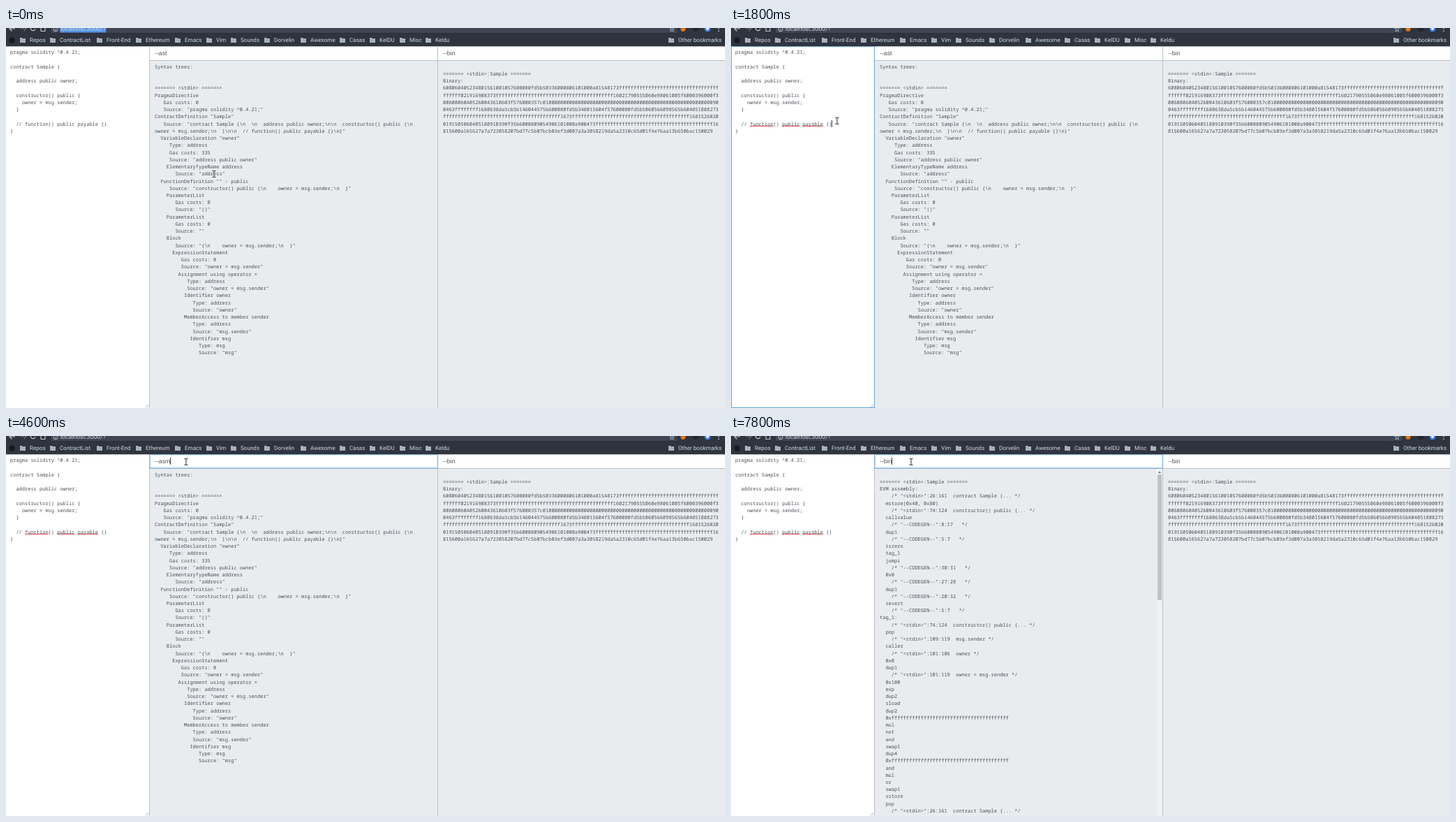
Write an HTML page that moves like this. It is 1030 by 544 pixels and loops after 8000 ms.

```html
<!DOCTYPE html>
<html lang="en">
<head>
<meta charset="utf-8">
<title>Compiler output panels</title>
<style>
  html, body { margin: 0; width: 100%; height: 100%; overflow: hidden; background: #fff; }
  svg { display: block; }
  text { white-space: pre; text-rendering: geometricPrecision; }
  .code { font: 7px "Noto Sans Mono", monospace; fill: #495057; }
  .flag { font: 8.75px "Liberation Sans", Arial, sans-serif; fill: #495057; }
  .mark { font: 8.1px Roboto, sans-serif; fill: #d3dae3; }
  .url { font: 8.7px Roboto, sans-serif; fill: #d3dae3; }
  .edge { fill: none; stroke: #bcc1c6; }
  .focus { fill: none; stroke: #66a5de; }
  .icon { fill: none; stroke: #c3c9d3; }
</style>
</head>
<body>
<svg id="stage" width="1030" height="544" viewBox="0 0 1030 544">
  <rect width="1030" height="544" fill="#fff"/>

  <g id="browser">
    <rect width="1030" height="26" fill="#2f343f"/>
    <rect x="63.5" y="-8" width="899" height="15.5" rx="2" fill="#404552" stroke="#2b2e39"/>
    <path class="icon" d="M5 1H13M8.500 -3L5 1L8.500 4.500M35.800 -1A3.300 3.300 0 1 0 42 1M50 0V4.500H56V0" stroke-width="1.100"/>
    <path class="icon" d="M21 1H29M25.500 4.500L29 1L25.500 -3" stroke-width="1.100" opacity=".4"/>
    <circle class="icon" cx="71" cy="2" r="3" stroke-width=".9"/>
    <path d="M71 1.500V4" class="icon"/>
    <rect id="pick" x="77.500" width="66" height="6.500" fill="#5294e2"/>
    <text class="url" x="78" y="4.300">localhost:3000/?</text>
    <path class="icon" d="M950.500 0H957.500L955 2L956.200 5L954 3.500L951.800 5L953 2Z" stroke-width=".8"/>
    <circle cx="970" cy="1.500" r="3.500" fill="#e2761b"/>
    <circle cx="988" cy="1" r="4" fill="#22262f"/>
    <circle cx="1005" cy="1" r="4.500" fill="#3f7fe0"/>
    <circle cx="1005" cy="1" r="2" fill="#fff"/>
    <path d="M1021 0V1.500M1021 3.500V5" stroke="#c3c9d3" stroke-width="1.500"/>
    <circle cx="8.500" cy="17.500" r="4.200" fill="#171a21"/>
  </g>

  <rect x="206" y="46" width="824" height="498" fill="#e9ecef"/>
  <path class="edge" d="M0 26.500H1030M205.500 26V544M618.500 26V544M206 46.500H1030"/>
  <path d="M200 543L204 539M202.500 543L204 541.500" stroke="#8a8f94" stroke-width=".7"/>

  <g id="left">
    <path id="typos" d="M27 140.500H60.600M73.200 140.500H98.400M102.600 140.500H132" stroke="#e0393e" stroke-width=".9"/>
  </g>
  <g id="ast"></g>
  <g id="asm">
    <rect x="610" y="47" width="8" height="497" fill="#f1f1f1"/>
    <rect x="611" y="55" width="6" height="180" fill="#c1c1c1"/>
    <path d="M612 53L614 50.500L616 53Z" fill="#606468"/>
  </g>
  <g id="bin"></g>
  <text id="flag" class="flag" x="213" y="39"></text>
  <text class="flag" x="626" y="39">--bin</text>

  <rect id="leftFocus" class="focus" x=".5" y="26.500" width="205" height="517"/>
  <rect id="flagFocus" class="focus" x="206" y="26.500" width="412.500" height="19.500"/>
  <rect id="caret" width="1" height="10" fill="#30353a"/>
  <g id="mouse" fill="none">
    <path d="M-2.500 -4.500H-.8L0 -4L.8 -4.500H2.500M0 -4V4M-2.500 4.500H-.8L0 4L.8 4.500H2.500" stroke="#fff" stroke-width="2" opacity=".7"/>
    <path d="M-2.500 -4.500H-.8L0 -4L.8 -4.500H2.500M0 -4V4M-2.500 4.500H-.8L0 4L.8 4.500H2.500" stroke="#24272b"/>
  </g>
</svg>
<script>
const LOOP = 8000, LINE = 10.24, TOP = 37.2;
const el = id => document.getElementById(id);
const F = n => "f".repeat(n);

function add(parent, tag, attrs, content = "") {
  const node = document.createElementNS("http://www.w3.org/2000/svg", tag);
  for (const key in attrs) node.setAttribute(key, attrs[key]);
  node.textContent = content;
  parent.append(node);
}

// Each source line sits on the shared row grid, starting at the given row.
function print(id, x, row, source) {
  source.split("\n").forEach((line, i) => {
    const indent = line.search(/\S/);
    if (indent < 0) return;
    add(el(id), "text", { class: "code", x: x + indent * 4.2, y: TOP + (row + i) * LINE }, line.trim());
  });
}

function bookmark(x, name) {
  const bar = el("browser");
  add(bar, "path", { d: `M${x - 14} 14h3l1 1h4v6h-8Z`, fill: "#a9b0bc" });
  add(bar, "text", { class: "mark", x, y: 20.3 }, name);
}

Object.entries({
  Repos: 34, ContractList: 77, "Front-End": 144, Ethereum: 200, Emacs: 256, Vim: 301,
  Sounds: 336, Dorvelin: 384, Awesome: 436, Casas: 492, KelDU: 535, Misc: 578, Keldu: 615,
  "Other bookmarks": 963
}).forEach(([name, x]) => bookmark(x, name));

print("left", 6, 0, `pragma solidity ^0.4.21;

contract Sample {

  address public owner;

  constructor() public {
    owner = msg.sender;
  }

  // function() public payable {}
}`);

print("ast", 213, 2, String.raw`Syntax trees:


======= <stdin> =======
PragmaDirective
   Gas costs: 0
   Source: "pragma solidity ^0.4.21;"
ContractDefinition "Sample"
   Source: "contract Sample {\n  \n  address public owner;\n\n  constructor() public {\n
owner = msg.sender;\n  }\n\n  // function() public payable {}\n}"
  VariableDeclaration "owner"
     Type: address
     Gas costs: 335
     Source: "address public owner"
    ElementaryTypeName address
       Source: "address"
  FunctionDefinition "" - public
     Source: "constructor() public {\n    owner = msg.sender;\n  }"
    ParameterList
       Gas costs: 0
       Source: "()"
    ParameterList
       Gas costs: 0
       Source: ""
    Block
       Source: "{\n    owner = msg.sender;\n  }"
      ExpressionStatement
         Gas costs: 0
         Source: "owner = msg.sender"
        Assignment using operator =
           Type: address
           Source: "owner = msg.sender"
          Identifier owner
             Type: address
             Source: "owner"
          MemberAccess to member sender
             Type: address
             Source: "msg.sender"
            Identifier msg
               Type: msg
               Source: "msg"`);

print("asm", 213, 3, `======= <stdin>:Sample =======
EVM assembly:
    /* "<stdin>":26:161  contract Sample {... */
  mstore(0x40, 0x80)
    /* "<stdin>":74:124  constructor() public {... */
  callvalue
    /* "--CODEGEN--":8:17   */
  dup1
    /* "--CODEGEN--":5:7   */
  iszero
  tag_1
  jumpi
    /* "--CODEGEN--":30:31   */
  0x0
    /* "--CODEGEN--":27:28   */
  dup1
    /* "--CODEGEN--":20:32   */
  revert
    /* "--CODEGEN--":5:7   */
tag_1:
    /* "<stdin>":74:124  constructor() public {... */
  pop
    /* "<stdin>":109:119  msg.sender */
  caller
    /* "<stdin>":101:106  owner */
  0x0
  dup1
    /* "<stdin>":101:119  owner = msg.sender */
  0x100
  exp
  dup2
  sload
  dup2
  0x${F(40)}
  mul
  not
  and
  swap1
  dup4
  0x${F(40)}
  and
  mul
  or
  swap1
  sstore
  pop
    /* "<stdin>":26:161  contract Sample {... */`);

print("bin", 626, 3, `======= <stdin>:Sample =======
Binary:
608060405234801561001057600080fd5b50336000806101000a81548173${F(34)}
${F(6)}021916908373${F(40)}16021790555060e98061005f6000396000f3
00608060405260043610603f576000357c01${"0".repeat(56)}90
0463${F(8)}1680638da5cb5b146044575b600080fd5b348015604f57600080fd5b5060566098565b604051808273
${F(40)}1673${F(40)}1681526020
0191505060405180910390f35b6000809054906101000a900473${F(40)}16
815600a165627a7a723058207bd77c5b07bcb03ef3d007a3a3058219da5a2310c65d01f4e76aa13b650bac150029`);

// time, x, y
const PATH = [
  [0, 298, 209], [600, 296, 228], [700, 282, 268], [800, 256, 301], [900, 222, 288],
  [1000, 190, 250], [1100, 164, 204], [1200, 144, 162], [1300, 134, 140], [1400, 138, 133],
  [1500, 144, 132], [1600, 148, 132], [1700, 150, 132], [1800, 152, 133], [1900, 153, 134],
  [2000, 154, 134], [4100, 258, 37]
];
// time, flag text, caret shown
const TYPING = [
  [0, "--ast", false], [4100, "--as", false], [4400, "--as", true], [4600, "--asm", true],
  [5500, "--asm", false], [6000, "--asm", true], [6600, "--asm", false],
  [6800, "--a", false], [7100, "--", true], [7800, "--bin", true]
];
const FOCUS = 1700, EDIT = 1800, BLINK = 2300, SWITCH = 4100, RESULT = 5200;

const at = (steps, t) => steps.findLast(step => step[0] <= t);
const show = (id, on) => el(id).setAttribute("visibility", on ? "visible" : "hidden");

function draw(t) {
  const [, x, y] = at(PATH, t);
  el("mouse").setAttribute("transform", `translate(${x} ${y})`);

  const [, text, blink] = at(TYPING, t);
  const flag = el("flag");
  if (flag.textContent !== text) flag.textContent = text;

  const inFlag = t >= SWITCH;
  const caret = el("caret");
  caret.setAttribute("x", inFlag ? Math.floor(213 + flag.getComputedTextLength()) : 144);
  caret.setAttribute("y", inFlag ? 31 : 132);
  show("caret", inFlag ? blink : t >= FOCUS && t < BLINK);

  show("pick", t < FOCUS);
  show("leftFocus", t >= FOCUS && !inFlag);
  show("flagFocus", inFlag);
  show("typos", t >= EDIT);
  show("ast", t < RESULT);
  show("asm", t >= RESULT);
}

const start = performance.now();
function tick() {
  draw((performance.now() - start) % LOOP);
  requestAnimationFrame(tick);
}
tick();
</script>
</body>
</html>
```
